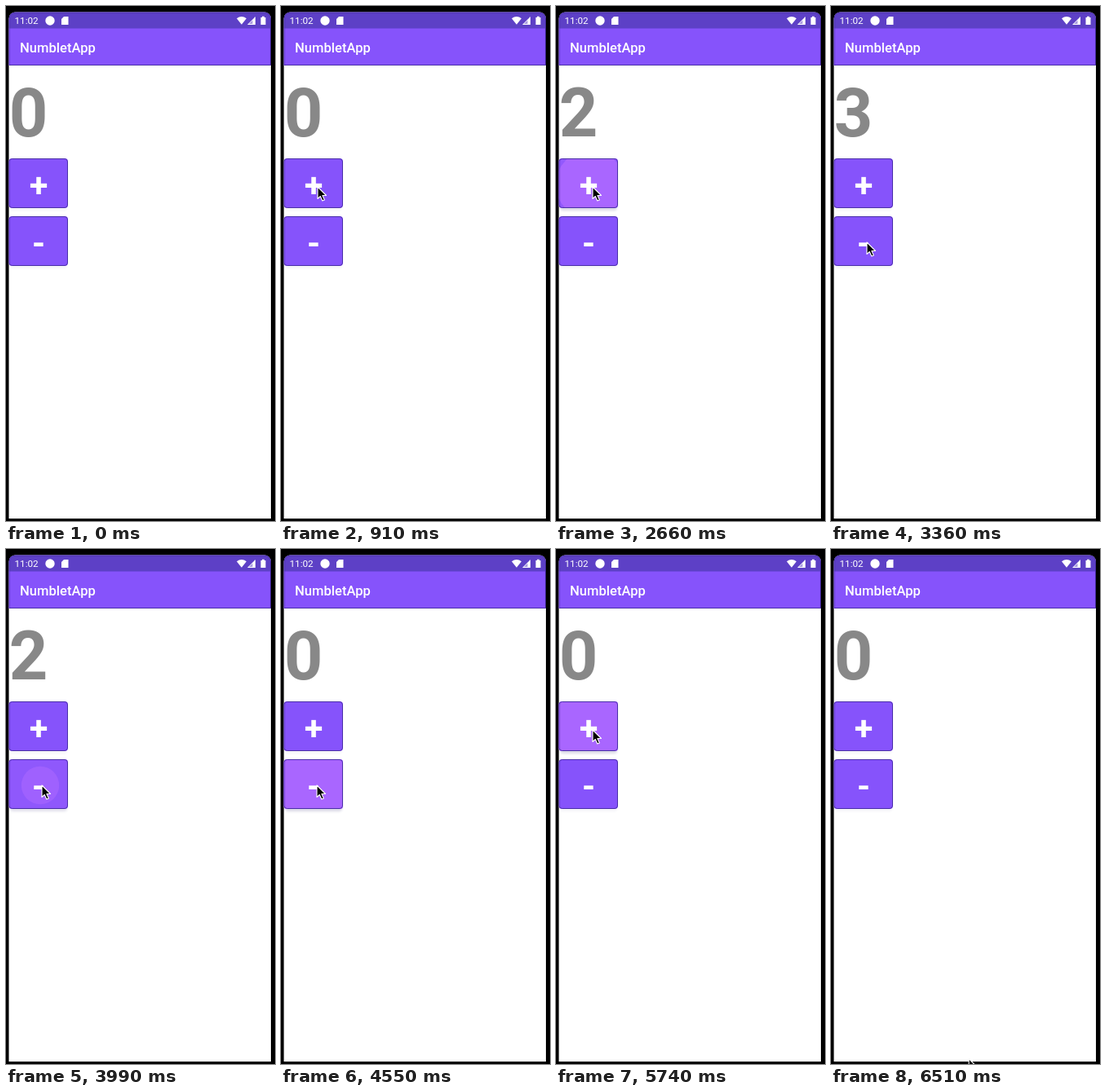
An HTML page that plays this animation: 330x632 px, repeating every 6580 ms.

```html
<!DOCTYPE html>
<html lang="en">
<head>
<meta charset="utf-8">
<title>Counter</title>
<style>
  html, body { margin: 0; width: 100%; height: 100%; overflow: hidden; background: #000; }
  svg { display: block; width: 330px; height: 632px; font-family: Roboto, sans-serif; }
  .sign { font-size: 41.5px; font-weight: 700; fill: #fff; text-anchor: middle; }
  .rim { fill: none; stroke: #4a2fa8; filter: url(#blur); }
</style>
</head>
<body>
<svg viewBox="0 0 330 632">
  <defs>
    <clipPath id="screen"><rect x="3.5" y="7.5" width="321.5" height="640" rx="8"/></clipPath>
    <clipPath id="face"><rect x="3.5" y="187" width="72.5" height="61" rx="4"/></clipPath>
    <filter id="soft" x="-20%" y="-20%" width="140%" height="140%"><feGaussianBlur stdDeviation="1.6"/></filter>
    <filter id="blur" x="-10%" y="-10%" width="120%" height="120%"><feGaussianBlur stdDeviation=".6"/></filter>
  </defs>

  <g clip-path="url(#screen)">
    <rect width="330" height="629" fill="#fff"/>
    <rect y="27" width="330" height="46" fill="#8653fb"/>
    <rect y="7" width="330" height="20.5" fill="#5d40c6"/>
    <path class="rim" d="M4 72.500V16q0-8 8-8H316.500q8 0 8 8V72.500z"/>
  </g>

  <g fill="#fff">
    <text x="10.5" y="22.3" font-size="11.7">11:02</text>
    <circle cx="54" cy="18" r="5.7"/>
    <path d="M71 13h5.500v10h-8.500v-7z"/>
    <path d="M283 15.200q6-4.400 12 0l-6 7.600z"/>
    <path d="M306 13v10h-10z"/>
    <path d="M302.500 17.500v4.500h-4.500z" fill="#5d40c6" opacity=".55"/>
    <path d="M312.500 14h1.500v-1.200h3v1.200h1.500v9h-6z"/>
    <text x="17" y="57" font-size="16.6" font-weight="500">NumbletApp</text>
  </g>

  <text id="count" x="3.7" y="160.4" font-size="83" font-weight="700" fill="#888">0</text>

  <g id="buttons"></g>

  <path id="cursor" d="M0 0V14.500L3.300 11.500L5.800 17L8.300 15.900L5.900 10.500H10.500z"
        fill="#000" stroke="#fff" stroke-width="1.1" stroke-linejoin="round"/>
</svg>

<script>
const LOOP = 6580, STEP = 70;
const RELEASE = 150, GROW = 225, FADE = 150;

// Evenly spaced clicks on one button
const clicks = (button, start, gap, count) =>
  Array.from({ length: count }, (_, i) => ({ button, at: start + i * gap }));
const presses = [
  ...clicks(0, 1420, 550, 3),
  ...clicks(1, 3510, 430, 4),
  ...clicks(0, 5560, 0, 1)
];

// Pointer stops, and the moves between them
const away = { x: 172, y: 635 }, plus = { x: 45, y: 222 }, minus = { x: 44, y: 290 };
const moves = [
  { start: 70, end: 420, to: plus },
  { start: 2950, end: 3360, to: minus },
  { start: 5100, end: 5460, to: plus },
  { start: 5800, end: LOOP, to: away }
];

const $ = id => document.getElementById(id);
const clamp = v => Math.max(0, Math.min(1, v));
const ease = u => u * u * (3 - 2 * u);

$('buttons').innerHTML = ['+', '-'].map((sign, i) => `
  <g transform="translate(0 ${i * 71})">
    <rect class="shade" x="5" y="190" width="70" height="61" rx="4" fill="#55508a" filter="url(#soft)"/>
    <g clip-path="url(#face)">
      <rect x="3" y="186" width="74" height="64" fill="#8653fb"/>
      <rect class="tint" x="3" y="186" width="74" height="64" fill="#a966ff"/>
      <circle class="ripple" cx="42" cy="219" fill="#a966ff"/>
      <rect class="rim" x="4" y="187.5" width="71.5" height="60" rx="3.5"/>
    </g>
    <text class="sign" x="40" y="233.6">${sign}</text>
  </g>`).join('');
const buttons = [...$('buttons').children].map(g => ({
  shade: g.querySelector('.shade'),
  tint: g.querySelector('.tint'),
  ripple: g.querySelector('.ripple')
}));

function drawButton({ shade, tint, ripple }, i, t) {
  const last = presses.filter(p => p.button === i && p.at <= t).pop();
  const age = last ? t - last.at : LOOP;
  const glow = clamp(age / 75) * clamp(1 - (age - GROW) / FADE);
  shade.setAttribute('opacity', 0.06 + 0.16 * glow);
  tint.setAttribute('opacity', 0.35 * glow);
  ripple.setAttribute('opacity', glow);
  ripple.setAttribute('r', 10 + 42 * (1 - (1 - clamp(age / GROW)) ** 1.5));
}

function drawCursor(t) {
  let { x, y } = away;
  for (const { start, end, to } of moves) {
    const e = ease(clamp((t - start) / (end - start)));
    x += (to.x - x) * e;
    y += (to.y - y) * e;
  }
  $('cursor').setAttribute('transform', `translate(${x} ${y})`);
}

function draw() {
  const t = Math.floor(performance.now() % LOOP / STEP) * STEP;
  $('count').textContent = presses
    .filter(p => p.at + RELEASE <= t)
    .reduce((sum, p) => sum + (p.button ? -1 : 1), 0);
  buttons.forEach((b, i) => drawButton(b, i, t));
  drawCursor(t);
  requestAnimationFrame(draw);
}
draw();
</script>
</body>
</html>
```
